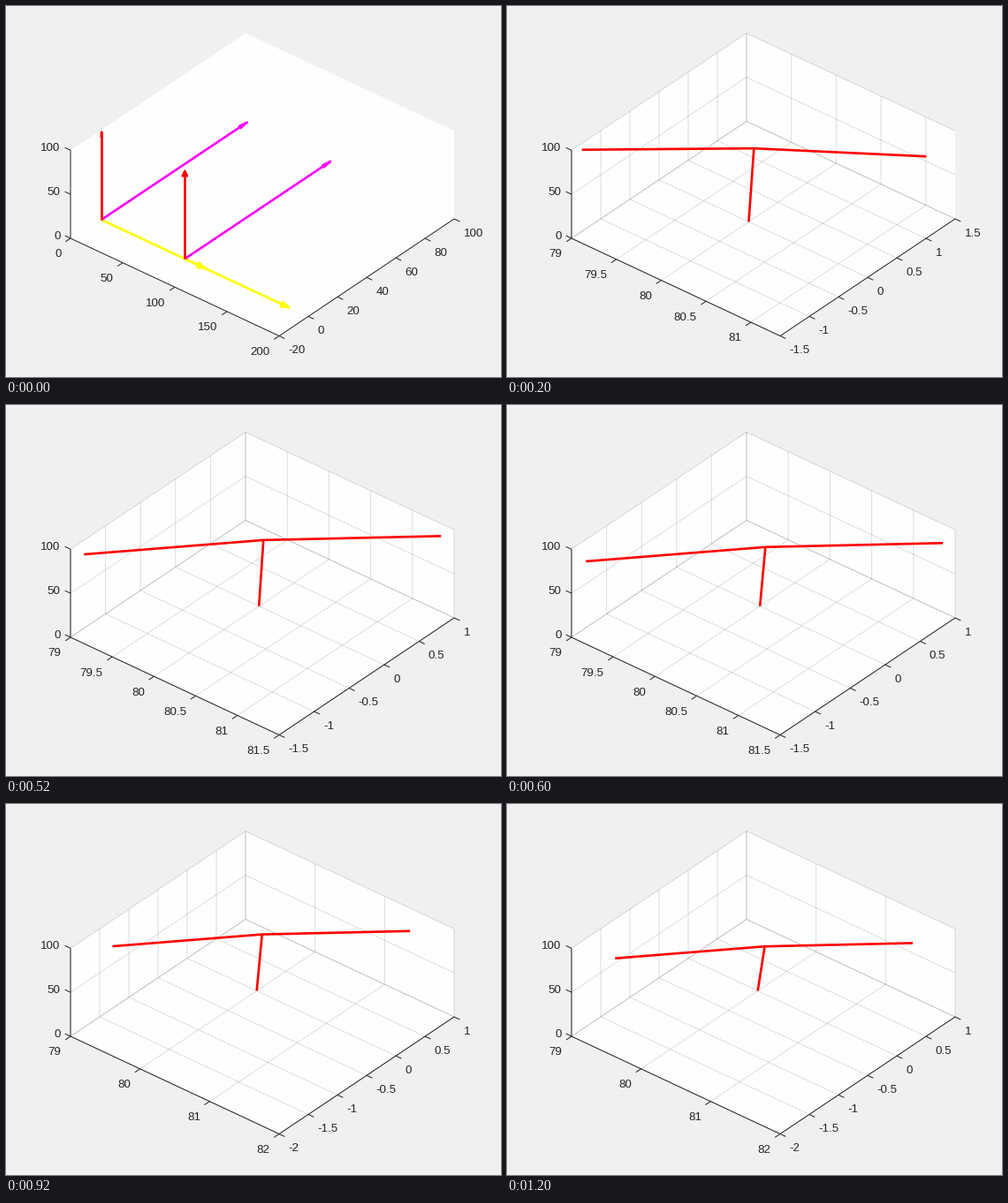
Write a matplotlib script that moves like this. It is 560 by 420 pixels and loops after 1400 ms.

```python
import matplotlib.pyplot as plt
import numpy as np
from matplotlib.animation import FuncAnimation

W, H, DPI, FRAMES = 560, 420, 100, 7
PX = 72 / DPI  # points per pixel
INK, RED, YELLOW, MAGENTA = "#262626", "#ff0000", "#ffff00", "#ff00ff"

# Projected box: floor corner and its three edge vectors, in pixels.
CORNER = np.array([73.0, 263.0])
X_EDGE = np.array([236.0, 110.5])
Y_EDGE = np.array([198.0, -132.5])
Z_EDGE = np.array([0.0, -99.7])
X_TICK = -7 * Y_EDGE / np.hypot(*Y_EDGE)
Y_TICK = 7 * X_EDGE / np.hypot(*X_EDGE)

# Linkage in data units: a post that leans further each step, and two arms.
FOOT = np.array([80.0, 0.0, 0.0])
POST = np.array([0.116, -0.089, 92.8])
LEAN = np.array([0.068, -0.067, -1.35])
LEFT_ARM = np.array([-1.115, -1.235, 0.0])
RIGHT_ARM = np.array([1.21, 1.095, 0.0])

plt.rcParams["font.family"] = "Liberation Sans"
fig = plt.figure(figsize=(W / DPI, H / DPI), dpi=DPI, facecolor="#f0f0f0")
ax = fig.add_axes([0, 0, 1, 1])


def at(u, v, w=0):
    """Pixel position of a point given as fractions of the box edges."""
    return CORNER + u * X_EDGE + v * Y_EDGE + w * Z_EDGE


def stroke(*points, color=INK, width=1, alpha=1):
    ax.plot(*np.array(points).T, color=color, lw=width * PX, alpha=alpha,
            solid_capstyle="butt", solid_joinstyle="round")


def label(value, pos, dx, dy, align):
    ax.text(pos[0] + dx, pos[1] + dy + 4.6, f"{value:g}", color=INK,
            fontsize=13.33 * PX, ha=align, va="baseline")


def ticks(low, high, step):
    """Values on an axis with their fraction along it."""
    values = np.arange(low, high + step / 100, step)
    return [(value, (value - low) / (high - low)) for value in values]


def draw_box(x_axis, y_axis, grid):
    outline = [at(0, 0), at(1, 0), at(1, 1), at(1, 1, 1), at(0, 1, 1), at(0, 0, 1)]
    ax.fill(*np.array(outline).T, color="#fefefe", lw=0)
    xs, ys, zs = ticks(*x_axis), ticks(*y_axis), ticks(0, 100, 50)

    if grid:
        lines = [(at(u, 0), at(u, 1), at(u, 1, 1)) for _, u in xs]
        lines += [(at(1, v), at(0, v), at(0, v, 1)) for _, v in ys]
        lines += [(at(0, 0, w), at(0, 1, w), at(1, 1, w)) for _, w in zs]
        for line in lines:
            stroke(*line, alpha=0.15)

    stroke(at(0, 0, 1), at(0, 0), at(1, 0), at(1, 1))
    for value, u in xs:
        stroke(at(u, 0), at(u, 0) + X_TICK)
        label(value, at(u, 0), -10.3, 16.8, "right")
    for value, v in ys:
        stroke(at(1, v), at(1, v) + Y_TICK)
        label(value, at(1, v), 10.5, 15.2, "left")
    for value, w in zs:
        stroke(at(0, 0, w), at(0, 0, w) - Y_TICK)
        label(value, at(0, 0, w), -11.5, -3.9, "right")


def arrow(start, vector, color, spread, length):
    tip = start + vector
    along = vector / np.hypot(*vector)
    across = np.array([-along[1], along[0]]) * spread
    base = tip - along * length
    stroke(start, tip, color=color, width=2.67)
    head = np.array([tip, base + across, base - across])
    ax.fill(*head.T, facecolor=color, edgecolor=color, lw=2.2 * PX, joinstyle="round")


def draw_triads():
    """Two coordinate frames, the second shifted along x."""
    draw_box((0, 200, 50), (-20, 100, 20), grid=False)
    origin = np.array([107.9, 242.0])
    for start, red_spread in ((origin, 0.4), (origin + 0.4 * X_EDGE, 2.8)):
        arrow(start, X_EDGE / 2, YELLOW, 3, 9.5)
        arrow(start, Y_EDGE / 1.2, MAGENTA, 1.5, 10)
        arrow(start, Z_EDGE, RED, red_spread, 6)


def draw_linkage(step):
    joint = FOOT + POST + LEAN * step
    left, right = joint + LEFT_ARM, joint + RIGHT_ARM

    # Limits round outwards to halves; the first view ends at the arm's tip.
    low, high = np.floor(left * 2) / 2, np.ceil(right * 2) / 2
    if step == 0:
        high[0] = right[0]
    x_axis = (low[0], high[0], 0.5 if high[0] - low[0] < 3 else 1)
    y_axis = (low[1], high[1], 0.5)

    def project(point):
        x, y, z = point
        return at((x - low[0]) / (high[0] - low[0]),
                  (y - low[1]) / (high[1] - low[1]), z / 100)

    draw_box(x_axis, y_axis, grid=True)
    stroke(project(left), project(joint), project(right), color=RED, width=2.67)
    stroke(project(FOOT), project(joint), color=RED, width=2.67)


def draw(i):
    ax.clear()
    ax.set(xlim=(0, W), ylim=(H, 0))
    ax.axis("off")
    if i == 0:
        draw_triads()
    else:
        draw_linkage(i - 1)
    return []


anim = FuncAnimation(fig, draw, frames=FRAMES, init_func=lambda: [],
                     interval=200, repeat=True, repeat_delay=0)
plt.show()
```
